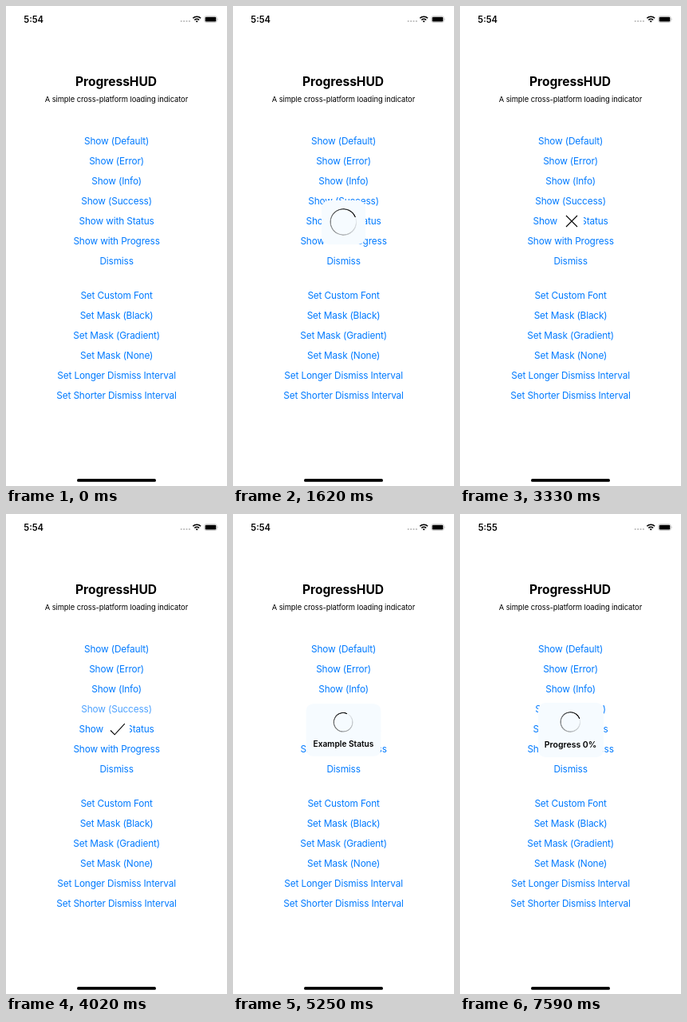
Recreate the animation shown at these times as an HTML page. Size 277 by 600 pixels, loop 8000 ms.

```html
<!DOCTYPE html>
<html lang="en">
<head>
<meta charset="utf-8">
<title>ProgressHUD</title>
<style>
  html, body { margin: 0; width: 100%; height: 100%; overflow: hidden; background: #fff; }
  body { position: relative; font-family: Inter, "Liberation Sans", sans-serif; }
  #screen { position: absolute; left: 0; top: 0; display: block; }
  #screen text { text-anchor: middle; }
  .title { font-size: 15.6px; font-weight: 700; letter-spacing: -.002em; }
  .subtitle { font-size: 9.4px; letter-spacing: -.008em; }
  .clock { font-size: 11.2px; font-weight: 600; }
  .button { font-size: 11.82px; letter-spacing: -.012em; fill: #007aff; }
  #hud { position: absolute; border-radius: 9px; background: #f6fbff; }
  #hud > * { position: absolute; }
  #ring {
    --edge: calc(var(--r) * 1px);
    width: calc(var(--r) * 2px); height: calc(var(--r) * 2px);
    left: 50%; margin: calc(var(--r) * -1px); border-radius: 50%;
    background: conic-gradient(rgba(0,0,0,.04), rgba(0,0,0,.5) 60%, #000);
    mask: radial-gradient(circle, transparent calc(var(--edge) - 2px), #000 calc(var(--edge) - 1.4px));
    -webkit-mask: radial-gradient(circle, transparent calc(var(--edge) - 2px), #000 calc(var(--edge) - 1.4px));
  }
  #icon { left: 50%; top: 50%; width: 20px; height: 16px; margin: -8.6px -9px; overflow: visible; }
  #status {
    left: 0; width: 100%; top: 45px; line-height: 15px; text-align: center;
    white-space: nowrap; font-size: 10.5px; font-weight: 600;
  }
</style>
</head>
<body>
<svg id="screen" width="277" height="600" viewBox="0 0 277 600">
  <text id="clock" class="clock" x="34.7" y="20.6">5:54</text>
  <g fill="#bbb">
    <circle cx="219.7" cy="19" r="1.1"/><circle cx="223.1" cy="19" r="1.1"/>
    <circle cx="226.5" cy="19" r="1.1"/><circle cx="229.9" cy="19" r="1.1"/>
  </g>
  <g fill="none" stroke="#000" stroke-width="1.6">
    <path d="M234.3 15.3a7 7 0 0 1 9.8 0M236.3 17.5a4.2 4.2 0 0 1 5.8 0"/>
    <path d="M239.2 20.6l-1.5-1.5a2.1 2.1 0 0 1 3 0z" fill="#000" stroke="none"/>
  </g>
  <rect x="248.7" y="12.7" width="15.6" height="7.8" rx="2.2" fill="none" stroke="#bbb" stroke-width=".7"/>
  <rect x="249.7" y="13.7" width="13.6" height="5.8" rx="1.3"/>
  <path d="M265.1 15.3q1.2 1.3 0 2.6z" fill="#aaa"/>
  <text class="title" x="138" y="100">ProgressHUD</text>
  <text class="subtitle" x="138.4" y="120">A simple cross-platform loading indicator</text>
  <g id="buttons"></g>
  <rect x="89" y="591.1" width="99" height="3.7" rx="1.85"/>
</svg>
<div id="hud">
  <div id="ring"></div>
  <svg id="icon" viewBox="0 0 20 16"><path fill="none" stroke="#000" stroke-width="1.1"/></svg>
  <div id="status"></div>
</div>
<script>
const LOOP = 8000, STEP = 30, CENTER = { x: 138.6, y: 270 };
const $ = id => document.getElementById(id);

const labels = [
  ['Show (Default)', 'Show (Error)', 'Show (Info)', 'Show (Success)',
   'Show with Status', 'Show with Progress', 'Dismiss'],
  ['Set Custom Font', 'Set Mask (Black)', 'Set Mask (Gradient)', 'Set Mask (None)',
   'Set Longer Dismiss Interval', 'Set Shorter Dismiss Interval']
];
const buttons = labels.flatMap((group, g) => group.map((label, i) => {
  const el = document.createElementNS('http://www.w3.org/2000/svg', 'text');
  el.setAttribute('class', 'button');
  el.setAttribute('x', 138.6);
  el.setAttribute('y', (g ? 366 : 173) + i * 25);
  el.textContent = label;
  return $('buttons').appendChild(el);
}));

const cross = 'M3 1L17 15M17 1L3 15';
const check = 'M1 9.5L6.2 14.8L18.8 1.2';

// Each tap runs from start to end, then rests; its label is fully back at settle.
const taps = [
  { start: 1260, end: 1620, settle: 2220, lead: 0, rest: 1, button: 0, w: 55, h: 55, r: 17.2, ringY: 27.5 },
  { start: 2790, end: 3060, settle: 3330, lead: 90, rest: .9, button: 1, w: 33, h: 28, icon: cross },
  { start: 3690, end: 4020, settle: 4380, lead: 30, rest: .7, button: 3, w: 33, h: 28, icon: check },
  { start: 4950, end: 5340, settle: 5910, lead: -30, rest: .9, button: 4, w: 97, h: 68, r: 13.2, ringY: 24, text: 'Example Status' },
  { start: 6840, end: 7080, settle: 7590, lead: 120, rest: .9, button: 5, w: 82, h: 68, r: 13.2, ringY: 24, text: 'Progress 0%' }
];

const clamp = v => Math.max(0, Math.min(1, v));

function labelOpacity(tap, age, t) {
  if (t >= tap.settle) return 1;
  if (age < 200) return 1 - .75 * clamp(age / 90);
  return .25 + (tap.rest - .25) * clamp((age - 200) / 160);
}

let shown = null;
function build(tap) {
  if (tap === shown) return;
  shown = tap;
  Object.assign($('hud').style, {
    width: tap.w + 'px', height: tap.h + 'px',
    left: CENTER.x - tap.w / 2 + 'px', top: CENTER.y - tap.h / 2 + 'px',
    background: tap.icon ? '#fff' : '#f6fbff'
  });
  $('ring').style.display = tap.r ? 'block' : 'none';
  $('ring').style.setProperty('--r', tap.r || 0);
  $('ring').style.top = (tap.ringY || 0) + 'px';
  $('icon').style.display = tap.icon ? 'block' : 'none';
  $('icon').firstElementChild.setAttribute('d', tap.icon || '');
  $('status').textContent = tap.text || '';
}

function draw(now) {
  const t = Math.floor(now % LOOP / STEP) * STEP;
  const tap = taps.filter(p => p.start <= t).pop();
  $('clock').textContent = t < 6840 ? '5:54' : '5:55';
  buttons.forEach(b => { b.style.opacity = 1; });
  if (!tap) {
    $('hud').style.opacity = 0;
    return;
  }
  build(tap);
  const age = Math.max(0, Math.min(t, tap.end) - tap.start + tap.lead);
  const grow = 1 - Math.pow(1 - clamp((age - 170) / 135), 1.4);
  buttons[tap.button].style.opacity = labelOpacity(tap, age, t);
  $('hud').style.opacity = Math.min(1, grow * 1.2);
  $('hud').style.transform = `scale(${(1 + .3 * grow) / 1.3})`;
  $('ring').style.transform = `rotate(${70 - (360 - age) * .5}deg)`;
}

const origin = performance.now();
function tick() {
  draw(performance.now() - origin);
  requestAnimationFrame(tick);
}
tick();
</script>
</body>
</html>
```
